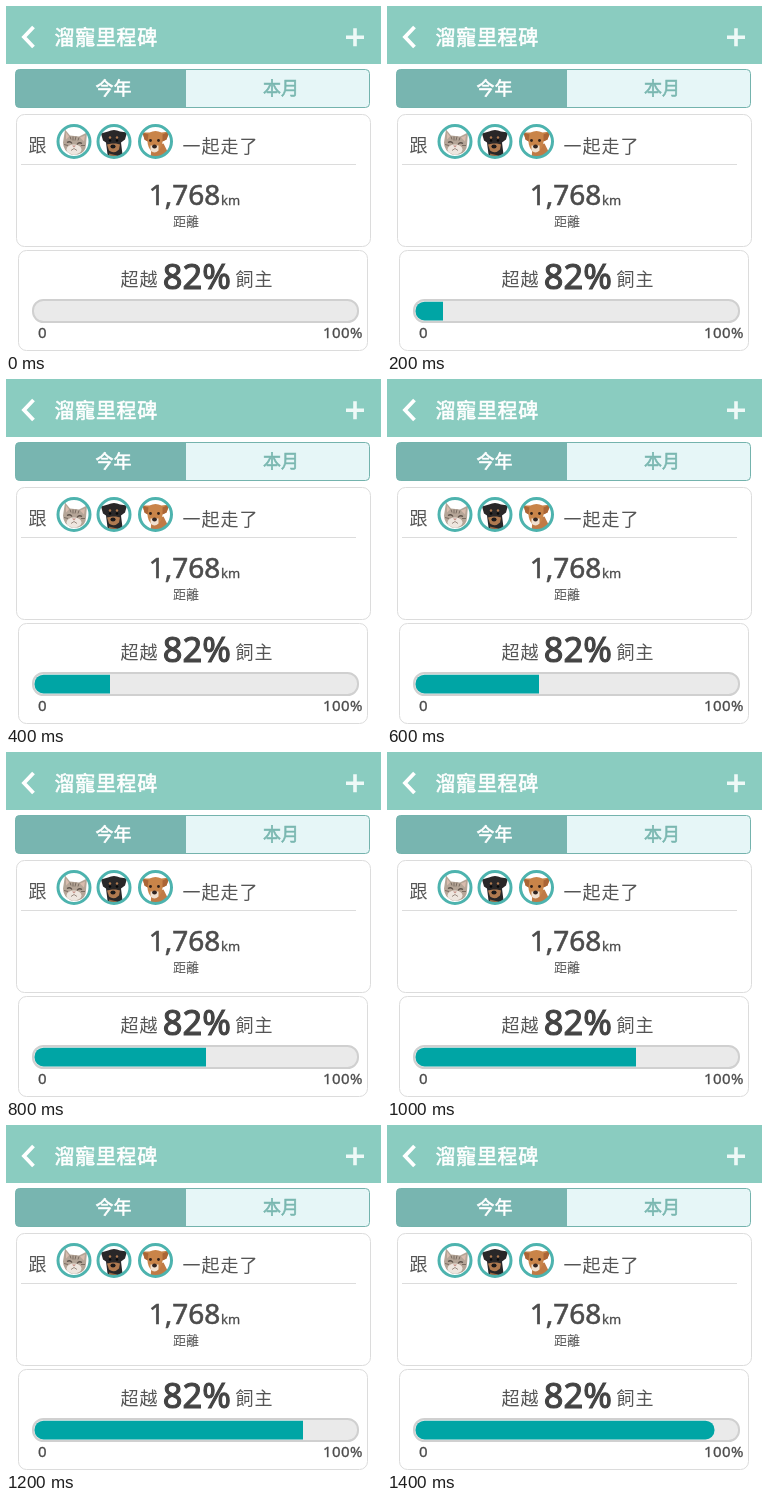
An HTML page for the animation above (1.6 s loop, 375 by 345 pixels).

```html
<!DOCTYPE html>
<html lang="zh-Hant">
<head>
<meta charset="utf-8">
<title>Pet walk milestones</title>
<style>
  html, body { margin: 0; width: 100%; height: 100%; overflow: hidden; background: #fff; }
  svg { display: block; width: 375px; height: 345px; }
  text {
    font-family: "Noto Sans CJK TC", "Noto Sans CJK JP", "Noto Sans CJK", sans-serif;
    fill: currentColor; stroke: currentColor; stroke-width: 0; color: #555;
  }
  .num { font-family: "Noto Sans", "Open Sans", sans-serif; color: #4c4c4c; stroke-width: .3; }
  .bold { stroke-width: .6; }
  .heavy { color: #444; stroke-width: 1.1; }
  .wide { letter-spacing: 1px; }
  .light { color: #fff; }
  .teal { color: #7ab7b0; }
  .card { fill: #fff; stroke: #dcdcdc; }
  .ring { fill: none; stroke: #4db3ae; stroke-width: 3; }
</style>
</head>
<body>
<svg viewBox="0 0 375 345" xmlns="http://www.w3.org/2000/svg">
  <defs>
    <clipPath id="face"><circle r="15.5"/></clipPath>
    <clipPath id="reveal"><rect id="edge" x="26" y="290" width="0" height="30"/></clipPath>
  </defs>

  <!-- header -->
  <rect width="375" height="58" fill="#8accc0"/>
  <path d="M27.500 21 18 31l9.500 10" fill="none" stroke="#fff" stroke-width="3.800"/>
  <text class="bold light" x="48.500" y="38.800" font-size="20" letter-spacing=".7">溜寵里程碑</text>
  <path d="M340 31.300h18M349 22.300v18" stroke="#eef9f7" stroke-width="3.600"/>

  <!-- tabs -->
  <rect x="9.500" y="63.500" width="354" height="38" rx="4" fill="#e6f6f7"/>
  <path d="M180 63.500H13.500a4 4 0 0 0-4 4v30a4 4 0 0 0 4 4H180z" fill="#78b5b0"/>
  <rect x="9.500" y="63.500" width="354" height="38" rx="4" fill="none" stroke="#74b3ad"/>
  <text class="bold light" x="89.500" y="89" font-size="18">今年</text>
  <text class="bold teal" x="257" y="89" font-size="18">本月</text>

  <!-- distance card -->
  <rect class="card" x="10.500" y="108.500" width="354" height="132" rx="8"/>
  <path d="M15 158.500H350" stroke="#dcdcdc"/>
  <text x="22.500" y="145.500" font-size="18">跟</text>
  <text class="wide" x="176.500" y="146.500" font-size="18">一起走了</text>

  <g transform="translate(68 135.500)">
    <circle r="17" fill="#fff"/>
    <g clip-path="url(#face)">
      <path d="M-9-12-4-6 5-5 13-9 12 3Q12 11 4 13L-3 13Q-11 9-11 1z" fill="#b5a597"/>
      <path d="M-8-9-8-2-5-5zM11-6 10 0 6-4z" fill="#d9bcae"/>
      <path d="M-1-5v4M2-5l-1 4M-4-5l1 3M5-4 4-1M-10 3l4 1M11 4 7 4" stroke="#796c62"/>
      <ellipse cx="0" cy="8" rx="7.500" ry="5" fill="#eee6df"/>
      <path d="M-7 1q3-2 5 1M8 2q-3-2-5 1" fill="none" stroke="#5b5048" stroke-width="1.300"/>
      <path d="M-2 4h4L0 6z" fill="#c58f85"/>
      <path d="M-3 9 0 7l3 2" fill="none" stroke="#9b8c82"/>
    </g>
    <circle class="ring" r="16"/>
  </g>

  <g transform="translate(108 135.500)">
    <circle r="17" fill="#fff"/>
    <g clip-path="url(#face)">
      <path d="M-13-8-6-10Q0-13 6-10L13-9 11-2 7 1 9 17H-6L-8 1-11-1z" fill="#292728"/>
      <path d="M-7 3-2 2 2 2 6 3 5 8Q0 13-5 9z" fill="#b07a50"/>
      <path d="M-5 12 3 14 2 17H-5z" fill="#99643f"/>
      <circle cx="-4" cy="-4" r="1.200" fill="#b07a50"/>
      <circle cx="3" cy="-4" r="1.200" fill="#b07a50"/>
      <circle cx="-4" cy="-1" r="1.300" fill="#090909"/>
      <circle cx="3" cy="-1" r="1.300" fill="#090909"/>
      <ellipse cx="-1" cy="5" rx="2.600" ry="2" fill="#1b191a"/>
    </g>
    <circle class="ring" r="16"/>
  </g>

  <g transform="translate(149.500 135.500)">
    <circle r="17" fill="#fff"/>
    <g clip-path="url(#face)">
      <path d="M-4 6 8 2 13 12 8 17H-5z" fill="#c07a45"/>
      <path d="M-13-9-6-9Q0-12 6-9L14-10 11-2 7 0Q7 6 2 10L-4 10Q-8 5-8 0L-11-2z" fill="#c98449"/>
      <path d="M-13-9-7-7-8 0-11-2zM14-10 7-7 7 0l4-2z" fill="#ab6536"/>
      <path d="M-5 4 3 4 3 9Q-1 13-5 9z" fill="#f0dfce"/>
      <circle cx="-5" cy="-1" r="1.400" fill="#302018"/>
      <circle cx="3" cy="-1" r="1.400" fill="#302018"/>
      <ellipse cx="-1" cy="5" rx="2.400" ry="1.900" fill="#302421"/>
    </g>
    <circle class="ring" r="16"/>
  </g>

  <text class="num bold" x="142.800" y="198.600" font-size="28">1,768</text>
  <text class="num" x="215" y="198.600" font-size="13">km</text>
  <text x="167" y="220" font-size="13" stroke-width=".3">距離</text>

  <!-- ranking card -->
  <rect class="card" x="12.500" y="244.500" width="349" height="100" rx="8"/>
  <text class="wide" x="114.500" y="280" font-size="18">超越</text>
  <text class="num heavy" x="156.800" y="283" font-size="34.500">82%</text>
  <text class="wide" x="229.500" y="280" font-size="18">飼主</text>

  <rect x="27" y="294" width="325" height="22" rx="10.500" fill="#eaeaea" stroke="#d0d0d0" stroke-width="2"/>
  <rect x="28.500" y="295.700" width="299" height="18.800" rx="9" fill="#00a5a5" clip-path="url(#reveal)"/>
  <text class="num" x="32" y="332" font-size="15">0</text>
  <text class="num" x="317" y="332" font-size="15" letter-spacing=".4">100%</text>
</svg>
<script>
  const LOOP = 1600, HOLD = 200;
  const edge = document.getElementById("edge");

  // The bar is uncovered in equal hard steps; the first step is empty.
  function draw(ms) {
    const step = Math.floor((ms % LOOP) / HOLD);
    const right = step ? Math.floor(8 + 48.2 * step) : 26;
    edge.setAttribute("width", right - 26);
  }

  let start = null;
  function tick(now) {
    if (start === null) start = now;
    draw(now - start);
    requestAnimationFrame(tick);
  }
  draw(0);
  requestAnimationFrame(tick);
</script>
</body>
</html>
```
